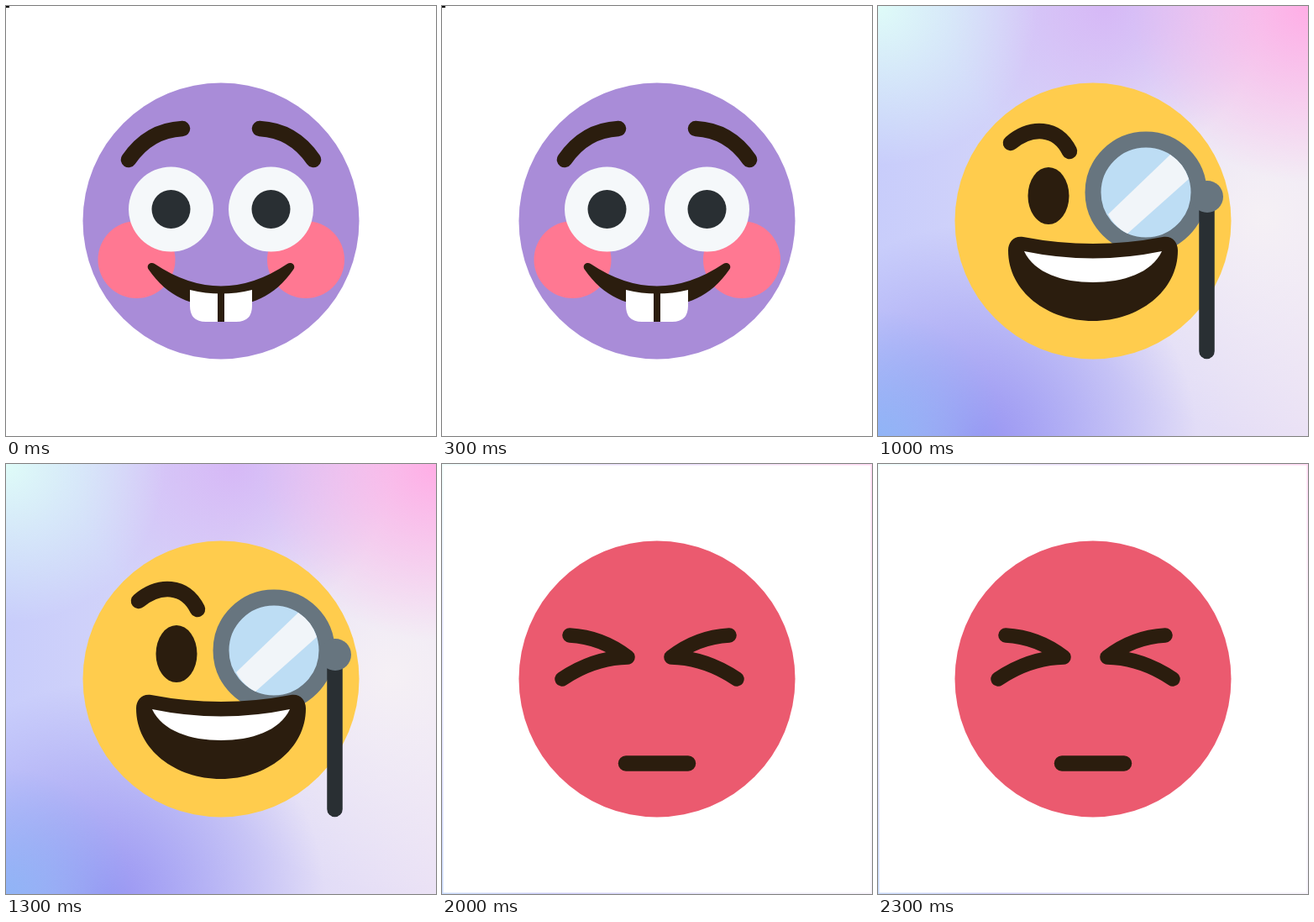
An HTML page that plays this animation: 512x512 px, repeating every 2.5 s.

```html
<!DOCTYPE html>
<html lang="en">
<head>
<meta charset="utf-8">
<title>Emoji shuffle</title>
<style>
  html, body { margin: 0; width: 100%; height: 100%; overflow: hidden; }
  body {
    background:
      radial-gradient(circle at 0 0, #dffcf8, transparent 190px),
      radial-gradient(circle at 512px 0, #ffaee6, transparent 210px),
      radial-gradient(circle at 270px 0, #d6b8f6, transparent 190px),
      radial-gradient(circle at 0 512px, #90b4f6, transparent 150px),
      radial-gradient(circle at 120px 520px, #9894f2, transparent 260px),
      radial-gradient(circle at 460px 250px, #f5f0f5, transparent 260px),
      linear-gradient(90deg, #c8cdfb, #ebe2f5);
  }
  svg { display: block; width: 512px; height: 512px; }
  .scene { visibility: hidden; }
  .line { fill: none; stroke: #2b1d0e; stroke-width: 18.5; stroke-linecap: round; stroke-linejoin: round; }
  .dark { fill: #2b1d0e; }
  .white { fill: #fff; }
  .red { fill: #eb5a6f; }
</style>
</head>
<body>
<svg viewBox="0 0 512 512">
  <defs>
    <circle id="head" cx="256" cy="256" r="164.5"/>
    <g id="sheet">
      <path class="white" d="M0 0H512V512H0Z"/>
      <path d="M0 0H4V2H0Z"/>
    </g>
    <g id="toothy">
      <g fill="#ff7892"><circle cx="155.5" cy="302" r="46"/><circle cx="357" cy="302" r="46"/></g>
      <g fill="#f5f8fa"><circle cx="196.5" cy="242" r="50.5"/><circle cx="315.5" cy="242" r="50.5"/></g>
      <g fill="#292f33"><circle cx="196.5" cy="242" r="23"/><circle cx="315.5" cy="242" r="23"/></g>
      <path class="line" d="M146 183Q170 148 210 146M302 146Q342 148 366 183"/>
      <path class="dark" d="M177 307Q256 360 335 307C340 304 346 309 342 314C320 346 290 358 256 358S192 346 170 314C166 309 172 304 177 307Z"/>
      <path class="white" d="M219 338Q256 347 293 338V357Q293 376 274 376H238Q219 376 219 357Z"/>
      <path class="dark" d="M252 340H260V376H252Z"/>
    </g>
  </defs>

  <g class="scene">
    <use href="#sheet"/>
    <use href="#head" fill="#a98cd8"/>
    <use href="#toothy"/>
  </g>

  <g class="scene">
    <use href="#sheet"/>
    <use href="#head" class="red"/>
    <path class="line" d="M146 183Q186 180 210 146M315 162Q349 176 366 216"/>
    <path class="dark" d="M210 192C225 192 231 206 229 221C226 243 215 257 204 257C189 257 178 245 180 226C183 205 196 192 210 192Z
      M300 197C320 196 333 213 332 236C331 258 320 273 308 273C292 271 278 248 276 227C275 208 285 198 300 197Z
      M155 286Q256 308 357 286C357 338 310 374 256 374S155 338 155 286Z"/>
    <path fill="#5c9243" d="M201 302Q256 312 311 302V365a55 55 0 0 1-110 0Z"/>
    <g fill="none" stroke="#fff" stroke-linecap="round">
      <path stroke-width="17" d="M256 322V333M256 391V402"/>
      <path stroke-width="15" d="M274 339C265 331 239.500 332 239.500 346C239.500 363 276 358 276 376C276 395 247 395 236 383"/>
    </g>
  </g>

  <g class="scene">
    <use href="#head" fill="#ffcc4d"/>
    <path class="line" d="M158 163C182 143 213 143 228 173"/>
    <ellipse class="dark" cx="203" cy="226" rx="24.5" ry="34"/>
    <circle cx="319" cy="222" r="63" fill="#bdddf4" stroke="#67757f" stroke-width="19"/>
    <path fill="#f1f5f9" d="M348 177A53.5 53.5 0 0 1 370 206L297 271A53.5 53.5 0 0 1 274 248Z"/>
    <path class="line" style="stroke:#292f33" d="M391.500 227V411"/>
    <circle cx="392" cy="227" r="19" fill="#67757f"/>
    <path class="dark" d="M173 275Q256 291 339 275C350 273 357 281 357 291C357 340 310 375 256 375S155 340 155 291C155 281 162 273 173 275Z"/>
    <path class="white" d="M174 292Q256 309 338 292C326 318 292 329 256 329S186 318 174 292Z"/>
  </g>

  <g class="scene">
    <path class="white" d="M1.500 1.500H510.500V510.500H1.500Z"/>
    <use href="#head" class="red"/>
    <use href="#toothy"/>
  </g>

  <g class="scene">
    <path class="white" opacity=".5" d="M0 0H512V512H0Z"/>
    <path class="white" d="M1.500 1.500H510.500V510.500H1.500Z"/>
    <use href="#head" class="red"/>
    <path class="line" style="stroke-width:17.5" d="M152 204Q190 206 221 230Q180 231 143 256M342 204Q304 206 273 230Q314 231 351 256"/>
    <path class="line" d="M219 356.500H293"/>
  </g>
</svg>
<script>
  const STEP = 500;
  const scenes = [...document.querySelectorAll('.scene')];

  function draw(now) {
    const current = Math.floor(now / STEP) % scenes.length;
    scenes.forEach((scene, i) => {
      scene.style.visibility = i === current ? 'visible' : 'hidden';
    });
  }

  function loop() {
    draw(performance.now());
    requestAnimationFrame(loop);
  }
  loop();
</script>
</body>
</html>
```
